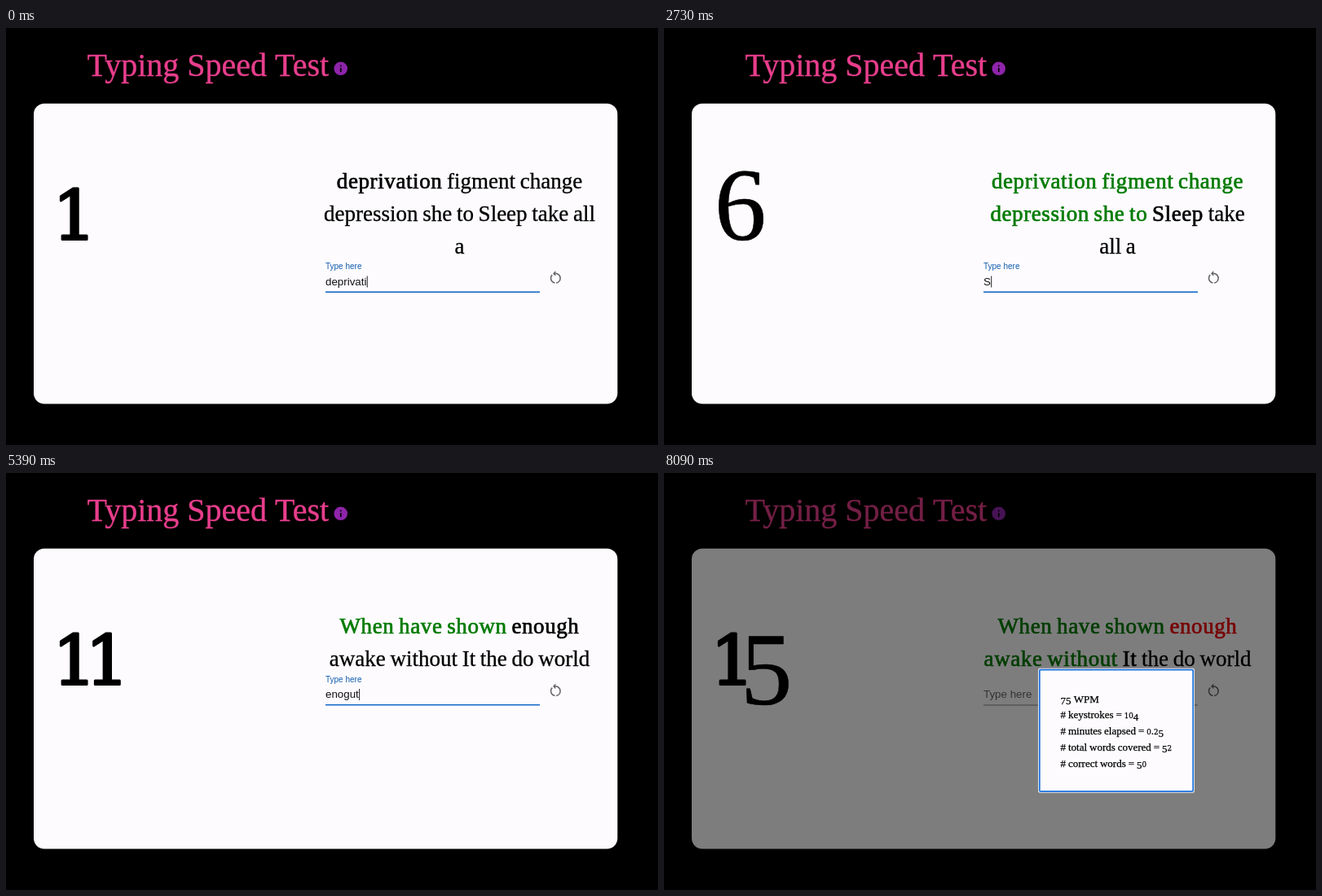
These frames come from a looping animation (800x512 px, 8.12 s). An HTML page with a canvas:

```html
<!DOCTYPE html>
<html lang="en">
<head>
<meta charset="utf-8">
<title>Typing Speed Test</title>
<style>
  html, body { margin: 0; width: 100%; height: 100%; overflow: hidden; background: #000; }
  canvas { display: block; width: 800px; height: 512px; }
</style>
</head>
<body>
<canvas id="stage" width="800" height="512"></canvas>
<script>
const ctx = document.getElementById('stage').getContext('2d');
const LOOP = 8120;
const FINISH = 7108;
const SECOND = 505;
const SERIF = '"Liberation Serif", serif';
const SLAB = '"DejaVu Serif", serif';
const SANS = '"Liberation Sans", sans-serif';

const rounds = [
  {
    words: 'deprivation figment change depression she to Sleep take all a'.split(' '),
    breaks: current => current < 3 ? [3, 9] : [3, 8],
    drop: 39.5
  },
  {
    words: 'When have shown enough awake without It the do world'.split(' '),
    breaks: () => [4],
    drop: 0
  }
];

// Bursts of evenly spaced keys: start, end, keys. "<" is backspace.
const bursts = [
  [-700, -30, 'deprivati'],
  [70, 1770, 'on figment change dep'],
  [1850, 3590, 'ression she to Sleep take all a '],
  [3890, 5370, 'When have shown enogut'],
  [5450, 6280, 'h awake wito'],
  [6650, 7080, '<hout ']
];

const keys = bursts.flatMap(([start, end, text]) =>
  [...text].map((key, i) => ({ key, at: start + (end - start) * i / (text.length - 1) })));

const easeOut = p => 1 - (1 - Math.min(1, Math.max(0, p))) ** 3;
const mix = (a, b, p) => a + (b - a) * p;

function typingAt(t) {
  const state = { round: 0, results: [], typed: '', lastKey: 0 };
  for (const { key, at } of keys) {
    if (at > t) break;
    state.lastKey = at;
    if (key === '<') {
      state.typed = state.typed.slice(0, -1);
    } else if (key !== ' ') {
      state.typed += key;
    } else {
      const words = rounds[state.round].words;
      state.results.push(state.typed === words[state.results.length]);
      state.typed = '';
      if (state.results.length === words.length) {
        state.round++;
        state.results = [];
      }
    }
  }
  return state;
}

function setFont(size, family, spacing = 0) {
  ctx.font = `${size}px ${family}`;
  ctx.letterSpacing = spacing + 'px';
}

function inkText(text, x, y, color, weight = 0) {
  ctx.fillStyle = ctx.strokeStyle = color;
  ctx.fillText(text, x, y);
  if (weight) {
    ctx.lineWidth = weight;
    ctx.lineJoin = 'round';
    ctx.strokeText(text, x, y);
  }
}

// Old-style figures: 0-2 sit at x-height, some others hang below the baseline.
const isLow = digit => '012'.includes(digit);
const figureDrop = (digit, size) => '34579'.includes(digit) ? size * 0.19 : 0;

function setFigureFont(digit, size) {
  if (isLow(digit)) setFont(size * 0.67, SLAB);
  else setFont(size, SERIF);
}

function drawCounter(number, x, y, size) {
  [...String(number)].forEach((digit, i) => {
    setFigureFont(digit, size);
    const { actualBoundingBoxLeft: left, actualBoundingBoxRight: right } = ctx.measureText(digit);
    if (i && isLow(digit)) x += size * 0.05;
    inkText(digit, x + left, y + figureDrop(digit, size), '#000', isLow(digit) ? 3 : 0.6);
    x += left + right + 1;
  });
}

function drawProse(text, x, y, size) {
  ctx.wordSpacing = '-0.3px';
  for (const part of text.split(/(\d)/).filter(Boolean)) {
    const digit = /\d/.test(part);
    if (digit) setFigureFont(part, size);
    else setFont(size, SERIF);
    inkText(part, x, y + (digit ? figureDrop(part, size) : 0), '#000', 0.25);
    x += ctx.measureText(part).width;
  }
  ctx.wordSpacing = '0px';
}

function drawHeader() {
  setFont(40, SERIF);
  inkText('Typing Speed Test', 99.5, 59, '#e83e8c', 0.4);
  ctx.fillStyle = '#8e24aa';
  ctx.beginPath();
  ctx.arc(410.7, 49.8, 8.3, 0, Math.PI * 2);
  ctx.fill();
  ctx.fillStyle = '#000';
  ctx.fillRect(409.9, 45.6, 1.7, 1.7);
  ctx.fillRect(409.9, 49, 1.7, 5);
}

function drawCard() {
  ctx.fillStyle = '#fdfbfe';
  ctx.beginPath();
  ctx.roundRect(34, 92.7, 716.3, 368.8, 13);
  ctx.fill();
}

function drawWords({ round, results }) {
  const { words, breaks } = rounds[round];
  const current = results.length;
  const stops = [0, ...breaks(current), words.length];
  const gap = 5.7;
  for (let line = 0; line < stops.length - 1; line++) {
    const row = words.slice(stops[line], stops[line + 1]).map((word, i) => {
      const index = stops[line] + i;
      const strong = index <= current;
      const spacing = strong ? 0.6 : 0;
      setFont(27, SERIF, spacing);
      const color = index >= current ? '#000' : results[index] ? '#007a00' : '#ee0000';
      return { word, spacing, color, weight: strong ? 0.7 : 0.3, width: ctx.measureText(word).width };
    });
    let x = 556.5 - (row.reduce((sum, w) => sum + w.width, 0) + gap * (row.length - 1)) / 2;
    for (const w of row) {
      setFont(27, SERIF, w.spacing);
      inkText(w.word, x, 197 + line * 40, w.color, w.weight);
      x += w.width + gap;
    }
  }
}

function drawRestart(x, y) {
  ctx.strokeStyle = ctx.fillStyle = '#666';
  ctx.lineWidth = 1.6;
  const arc = (from, to) => {
    ctx.beginPath();
    ctx.arc(x, y, 5.8, from * Math.PI / 180, to * Math.PI / 180);
    ctx.stroke();
  };
  arc(-90, 82);
  arc(98, 225);
  ctx.beginPath();
  ctx.moveTo(x, y - 9.1);
  ctx.lineTo(x - 3.3, y - 5.8);
  ctx.lineTo(x, y - 2.5);
  ctx.fill();
}

function drawField(t, { round, typed, lastKey }) {
  const { drop } = rounds[round];
  const rest = easeOut((t - FINISH) / 200);
  const fade = Math.min(1, Math.max(0, (t - FINISH) / 200));
  setFont(mix(10, 13.35, rest), SANS);
  inkText('Type here', 392, mix(256.6, 276.4, rest) + drop,
    `rgb(${mix(21, 101, fade)},${mix(94, 100, fade)},${mix(175, 102, fade)})`);

  if (t >= FINISH) {
    ctx.fillStyle = '#858387';
    ctx.fillRect(392, 284.5 + drop, 263, 1);
  } else {
    ctx.fillStyle = '#1a6ac8';
    ctx.fillRect(392, 283.9 + drop, 263, 1.6);
    setFont(13.35, SANS);
    inkText(typed, 392, 276.4 + drop, '#111');
    if ((t - lastKey) % 500 < 250) {
      ctx.fillStyle = '#222';
      ctx.fillRect(392.3 + ctx.measureText(typed).width, 265 + drop, 1, 14);
    }
  }
  drawRestart(674.3, 267.7 + drop);
}

function drawResult(t) {
  if (t < 7145) return;
  ctx.fillStyle = `rgba(0,0,0,${0.5 * easeOut((t - 7150) / 145)})`;
  ctx.fillRect(0, 0, 800, 512);
  const box = (inset, radius, color) => {
    ctx.fillStyle = color;
    ctx.beginPath();
    ctx.roundRect(459 + inset, 239.8 + inset, 192 - 2 * inset, 153 - 2 * inset, radius);
    ctx.fill();
  };
  box(0, 2.5, 'rgba(255,255,255,.8)');
  box(1, 2, '#1a73e0');
  box(2.7, 0.5, '#fdfbfe');
  [
    '75 WPM',
    '# keystrokes = 104',
    '# minutes elapsed = 0.25',
    '# total words covered = 52',
    '# correct words = 50'
  ].forEach((line, i) => drawProse(line, 486.5, 281.5 + i * 19.8, 13));
}

function frame(now) {
  const t = now % LOOP;
  const state = typingAt(t);
  const seconds = Math.min(15, Math.max(1, 15 + Math.floor((t - FINISH) / SECOND)));
  ctx.fillStyle = '#000';
  ctx.fillRect(0, 0, 800, 512);
  drawHeader();
  drawCard();
  drawCounter(seconds, 67, 260, 127);
  drawWords(state);
  drawField(t, state);
  drawResult(t);
  requestAnimationFrame(frame);
}
requestAnimationFrame(frame);
</script>
</body>
</html>
```
